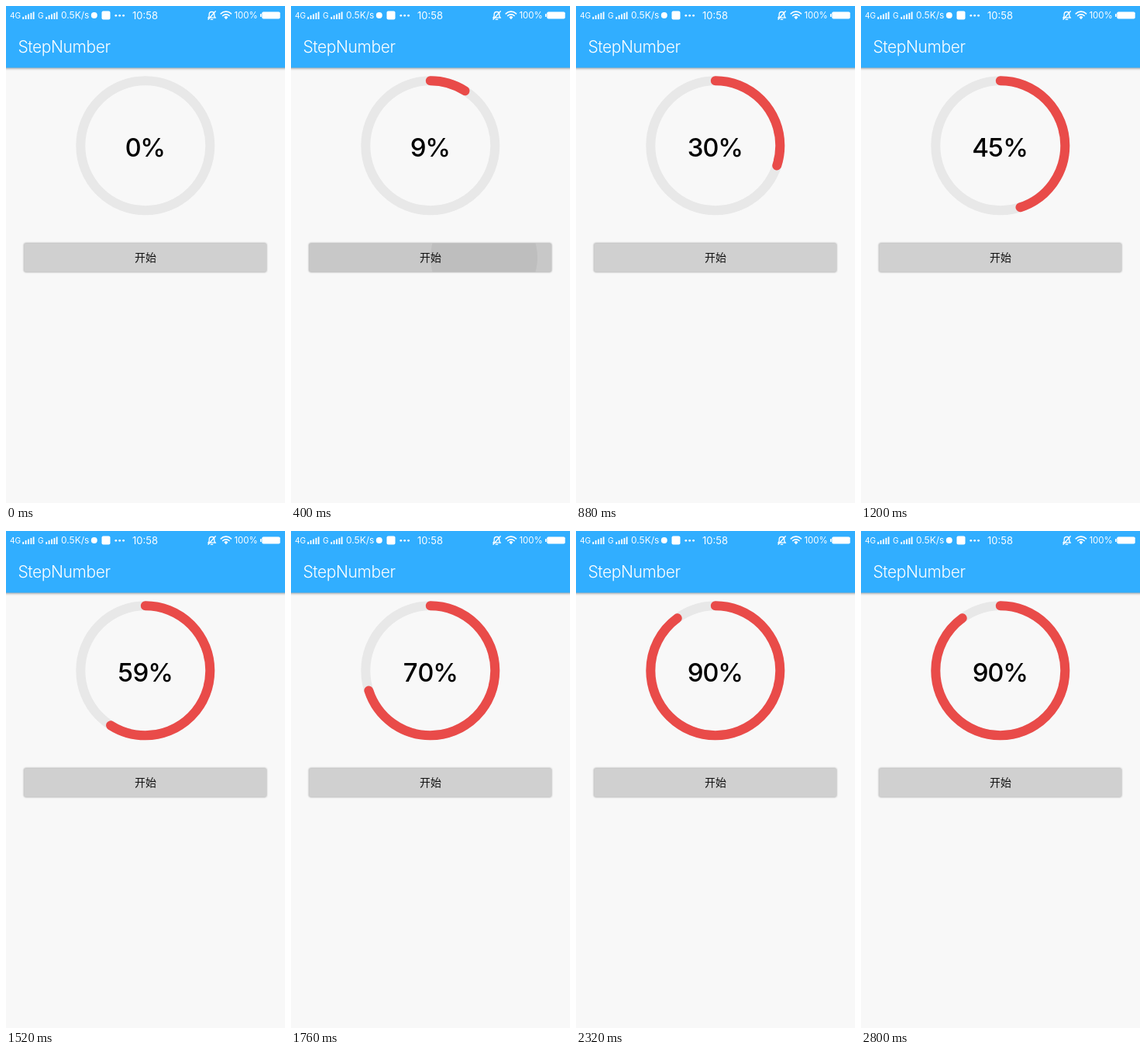
An HTML page for the animation above (2960 ms loop, 360 by 640 pixels).

```html
<!DOCTYPE html>
<html lang="zh">
<head>
<meta charset="utf-8">
<title>StepNumber</title>
<style>
  html, body { margin: 0; width: 100%; height: 100%; overflow: hidden; background: #f8f8f8; }
  svg { display: block; width: 360px; height: 640px; font-family: Inter, Roboto, sans-serif; }
  .bar { filter: drop-shadow(0 1px 1.5px rgba(0, 0, 0, .38)); }
  .button { filter: drop-shadow(0 .8px .9px rgba(0, 0, 0, .4)); }
  .status { fill: #fff; font-size: 11.5px; }
  .line { fill: none; stroke: #fff; stroke-width: 1.3; stroke-linecap: round; }
  .title { font-size: 21px; font-weight: 300; letter-spacing: -.4px; fill: #fff; }
  .percent { font-size: 33px; font-weight: 500; letter-spacing: -1.5px; font-variant-numeric: tabular-nums; }
  .label { font: 500 14px "Noto Sans CJK SC", "Noto Sans CJK", sans-serif; fill: #111; }
</style>
</head>
<body>
<svg viewBox="0 0 360 640">
  <defs>
    <clipPath id="buttonClip"><rect x="23.3" y="305.4" width="312.8" height="37.2" rx="2"/></clipPath>
    <path id="signal" d="M1.2 17v-3M4.6 17v-5M8 17v-6.5M11.4 17v-8M14.6 17v-9.5" stroke="#fff" stroke-width="1.8"/>
  </defs>
  <rect width="360" height="640" fill="#f8f8f8"/>
  <rect class="bar" x="-6" y="-6" width="372" height="85.5" fill="#31aeff"/>

  <g class="status">
    <text x="5" y="16" font-size="10.2">4G</text>
    <use href="#signal" x="21"/>
    <text x="41" y="16" font-size="10.2">G</text>
    <use href="#signal" x="51"/>
    <text x="71" y="16.3" font-size="12">0.5K/s</text>
    <circle cx="113.8" cy="12" r="4"/>
    <rect x="123.5" y="6.5" width="11" height="11" rx="2"/>
    <circle cx="141.8" cy="12.3" r="1.4"/>
    <circle cx="146.7" cy="12.3" r="1.4"/>
    <circle cx="151.6" cy="12.3" r="1.4"/>
    <text x="163" y="17" font-size="13">10:58</text>
    <g class="line">
      <path d="M261 15.2h9.2L268.8 13v-2.2a3.3 3.3 0 0 0-6.6 0V13zM264.3 17.3h2.4M261 17.2 270.3 6.8"/>
      <path d="M277.3 9.8a9.4 9.4 0 0 1 13.2 0M279.7 12.5a6 6 0 0 1 8.4 0" stroke-width="1.7"/>
    </g>
    <path d="M281.4 14.4a3.5 3.5 0 0 1 5 0L283.9 17.2z"/>
    <text x="294.4" y="16.3">100%</text>
    <rect x="330.3" y="7.4" width="23.4" height="9.2" rx="1.8"/>
    <rect x="328" y="10" width="1.7" height="4" rx=".6"/>
  </g>
  <text class="title" x="15.5" y="60">StepNumber</text>

  <g fill="none" stroke-width="12" transform="rotate(-90 179.8 179.8)">
    <circle cx="179.8" cy="179.8" r="83.5" stroke="#e8e8e8"/>
    <circle id="arc" cx="179.8" cy="179.8" r="83.5" stroke="#e94b49" stroke-linecap="round" pathLength="100"/>
  </g>
  <text id="percent" class="percent" x="179" y="194" text-anchor="middle">0%</text>

  <rect class="button" x="23.3" y="305.4" width="312.8" height="37.2" rx="2" fill="#d0d0d0"/>
  <g id="ripple" clip-path="url(#buttonClip)">
    <rect x="23" y="305" width="314" height="38" fill-opacity=".04"/>
    <circle id="wave" cx="249" cy="324" r="0" fill-opacity=".05"/>
  </g>
  <text class="label" x="180" y="329.3" text-anchor="middle">开始</text>
</svg>
<script>
  const LOOP = 2960, TICK = 80;
  const COUNT_START = 190, RATE = 0.0446, GOAL = 90;
  // time, wave radius, ripple opacity
  const RIPPLE = [[80, 0, 0], [160, 20, .8], [400, 69, 1], [560, 130, .6], [720, 220, 0]];
  const $ = id => document.getElementById(id);
  const arc = $("arc"), percent = $("percent"), ripple = $("ripple"), wave = $("wave");

  function sample(table, time) {
    const next = table.findIndex(row => row[0] > time);
    if (next < 1) return table[next === 0 ? 0 : table.length - 1];
    const from = table[next - 1], to = table[next];
    const k = (time - from[0]) / (to[0] - from[0]);
    return from.map((v, i) => v + (to[i] - v) * k);
  }

  function draw(time) {
    const value = Math.floor(Math.min(GOAL, Math.max(0, (time - COUNT_START) * RATE)));
    percent.textContent = value + "%";
    arc.setAttribute("stroke-dasharray", `${value} 200`);
    arc.setAttribute("visibility", value ? "visible" : "hidden");

    const [, radius, opacity] = sample(RIPPLE, time);
    wave.setAttribute("r", radius);
    ripple.setAttribute("opacity", opacity);
  }

  function frame() {
    const time = performance.now() % LOOP;
    draw(Math.floor(time / TICK) * TICK);
    requestAnimationFrame(frame);
  }
  frame();
</script>
</body>
</html>
```
